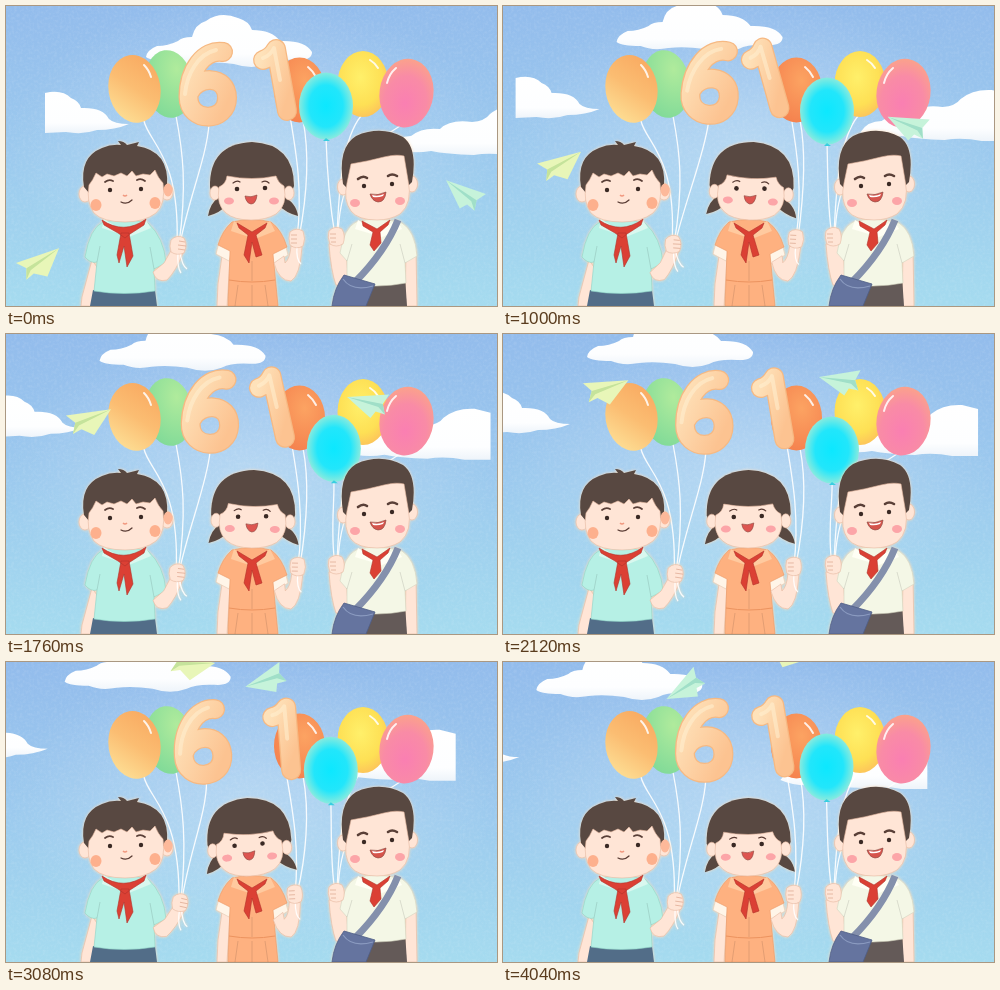
An HTML page for the animation above (4.12 s loop, 491 by 300 pixels).

```html
<!DOCTYPE html>
<html lang="en">
<head>
<meta charset="utf-8">
<title>Children with balloons</title>
<style>
html, body { margin: 0; width: 100%; height: 100%; overflow: hidden; background: #a0cbee; }
svg { position: absolute; left: 0; top: 0; width: 491px; height: 300px; }
.kid { filter: drop-shadow(0 0 1.5px #ffdfbd); }
.skin { fill: #ffe5d6; stroke: #e6b9a2; stroke-width: .6; }
.hair { fill: #584841; }
.line { fill: none; stroke: #5a3c34; stroke-width: 1.2; stroke-linecap: round; stroke-linejoin: round; }
.brow { fill: none; stroke: #5a4038; stroke-width: 1.8; stroke-linecap: round; }
.finger { fill: none; stroke: #e0ad96; stroke-width: .8; }
.string { fill: none; stroke: #fff; stroke-width: 1.3; opacity: .9; }
.shine { fill: none; stroke: #fff; stroke-width: 2; stroke-linecap: round; opacity: .85; }
.red { fill: #db4034; stroke: #b23229; stroke-width: .6; stroke-linejoin: round; }
.eye { fill: #3a2924; }
.pink { fill: #fca5a8; }
.fold { fill: none; stroke: #0000001c; }
.digit path { fill: none; stroke-linecap: round; stroke-linejoin: round; }
.digit .edge { stroke: #f6b983; stroke-width: 20; }
.digit .body { stroke: url(#peach); stroke-width: 17.5; }
.digit .glow { stroke: #fff0d2; stroke-width: 4; opacity: .55; }
</style>
</head>
<body>
<svg viewBox="0 0 491 300">
  <defs>
    <linearGradient id="sky" x2="0" y2="1">
      <stop stop-color="#93bcec"/><stop offset=".5" stop-color="#9ccaee"/><stop offset="1" stop-color="#a5dbef"/>
    </linearGradient>
    <radialGradient id="haze" cx=".5" cy=".47" r=".5">
      <stop stop-color="#fff" stop-opacity=".28"/><stop offset="1" stop-color="#fff" stop-opacity="0"/>
    </radialGradient>
    <filter id="grain" x="0" y="0" width="1" height="1">
      <feTurbulence type="fractalNoise" baseFrequency=".35" numOctaves="2" seed="4"/>
      <feColorMatrix values="0 0 0 0 1  0 0 0 0 1  0 0 0 0 1  1.2 0 0 0 -.5"/>
    </filter>
  </defs>
  <rect width="491" height="300" fill="url(#sky)"/>
  <rect width="491" height="300" fill="url(#haze)"/>
  <rect width="491" height="300" filter="url(#grain)" opacity=".18"/>
</svg>

<svg viewBox="0 0 491 300">
  <defs>
    <linearGradient id="orange" x1=".85" y1=".1" x2=".25" y2=".95"><stop stop-color="#f9ab62"/><stop offset=".5" stop-color="#fbbd72"/><stop offset="1" stop-color="#fddc92"/></linearGradient>
    <radialGradient id="green" cx=".7" cy=".3" r=".8"><stop stop-color="#b0eb9c"/><stop offset="1" stop-color="#80da98"/></radialGradient>
    <radialGradient id="coral" cx=".6" cy=".35" r=".75"><stop stop-color="#fca362"/><stop offset="1" stop-color="#f47e4c"/></radialGradient>
    <radialGradient id="yellow" cx=".45" cy=".4" r=".7"><stop stop-color="#fff06a"/><stop offset=".6" stop-color="#fee055"/><stop offset="1" stop-color="#fcb95c"/></radialGradient>
    <radialGradient id="rose" cx=".5" cy=".65" r=".72"><stop stop-color="#fa7fb2"/><stop offset=".55" stop-color="#f98ba6"/><stop offset="1" stop-color="#fba884"/></radialGradient>
    <radialGradient id="cyan" cx=".5" cy=".5" r=".52"><stop stop-color="#0ce8ff"/><stop offset=".6" stop-color="#22e6fb"/><stop offset="1" stop-color="#93ebdb"/></radialGradient>
    <linearGradient id="peach" y2=".8"><stop stop-color="#fee2ba"/><stop offset="1" stop-color="#fcc391"/></linearGradient>
    <linearGradient id="cloud" x2="0" y2="1"><stop stop-color="#fff"/><stop offset=".75" stop-color="#fdfeff"/><stop offset="1" stop-color="#eef4fa"/></linearGradient>
  </defs>

  <g id="clouds" fill="url(#cloud)">
    <path d="M140 51Q141 44 151 40Q162 40 172 35Q176 31 186 31Q189 18 200 15Q214 5 232 12Q243 15 246 24Q266 24 274 35Q299 34 306 46Q306 55 290 54Q272 53 262 58Q246 64 228 58Q208 55 192 57Q176 60 164 55Q145 55 140 51Z"/>
    <path d="M39 87Q56 83 65 92Q73 95 75 102Q97 101 103 113Q108 118 123 118Q109 124 91 124Q77 129 60 126L39 127Z"/>
    <path d="M384 141Q391 130 405 130Q416 121 434 123Q444 113 466 116Q479 115 484 108Q496 98 515 99L531 103V150H505Q485 146 468 149Q440 148 425 145Q402 149 384 141Z"/>
  </g>

  <g id="strings"></g>

  <ellipse cx="163" cy="78" rx="24" ry="34" fill="url(#green)" transform="rotate(-8 163 78)"/>
  <ellipse cx="128.500" cy="83" rx="26" ry="34" fill="url(#orange)" transform="rotate(-9 128 83)"/>
  <path class="shine" d="M138 59Q143 64 145 71"/>
  <ellipse cx="293.500" cy="84" rx="25.500" ry="32.500" fill="url(#coral)"/>
  <path class="shine" d="M302 61Q307 65 310 71"/>
  <ellipse cx="357" cy="78" rx="25.500" ry="33" fill="url(#yellow)"/>
  <path class="shine" d="M364 54Q369 57 372 62"/>
  <ellipse cx="400.500" cy="87" rx="27" ry="34.500" fill="url(#rose)" transform="rotate(8 400 87)"/>
  <path class="shine" d="M390 62Q383 68 381 77"/>
  <g id="six" class="digit"></g>
  <g id="one" class="digit"></g>
  <g id="blue">
    <ellipse cx="320" cy="100" rx="27" ry="33.500" fill="url(#cyan)"/>
    <path d="M317 135l3-3 4 3z" fill="#38cfe0"/>
  </g>

  <g id="planeA">
    <path d="M20-15L-21-1L-11 4L-11 15L-4 9L9 12Z" fill="#e8f6b8"/>
    <path d="M20-15L-11 4L-11 15L-7 6Z" fill="#c5e39b"/>
  </g>
  <g id="planeB">
    <path d="M-18-15L20-2L11 4L9 14L2 8L-5 12Z" fill="#c6f3da"/>
    <path d="M-18-15L11 4L9 14L6 5Z" fill="#a0dfc8"/>
  </g>

  <!-- boy in mint -->
  <g class="kid">
    <path class="skin" d="M86 254L76 291L75 300H86L93 264Z"/>
    <path d="M87 284H149L151 300H84Z" fill="#526d88"/>
    <path d="M97 216Q84 222 79 251Q85 258 91 256L88 285Q118 290 149 285L148 263L160 257Q158 232 142 217Q119 211 97 216Z" fill="#b6f0e5" stroke="#8fd2c6" stroke-width=".6"/>
    <path class="fold" d="M91 256L94 240M148 263L144 241"/>
    <g id="armA">
      <path class="skin" d="M147 266Q150 277 161 274Q170 265 177 247L166 243L158 257Z"/>
      <path class="string" d="M172 246Q171 262 175 267M174 246Q176 260 181 263"/>
      <path class="skin" d="M165 234Q171 228 178 232Q182 239 178 247Q171 250 165 246Q163 240 165 234Z"/>
      <path class="finger" d="M173 235L179 236M172 239L180 240M172 243L179 244"/>
    </g>
    <path d="M98 213L119 226L139 213L145 222L123 231L96 222Z" fill="#d9f8ef"/>
    <path class="red" d="M96 214Q118 229 140 213L138 219L124 228L119 232L112 227L98 219ZM115 227H123L127 250L121 261L118 240L113 257L111 249Z"/>
    <ellipse class="skin" cx="79" cy="188" rx="6" ry="8"/>
    <ellipse class="skin" cx="161" cy="186" rx="6" ry="8"/>
    <path class="hair" d="M78 181Q73 151 96 142Q105 138 115 139L112 135Q118 135 121 139L133 136L131 140Q164 145 161 181L154 187H83Z"/>
    <path class="skin" d="M83 179Q87 174 90 167L96 171L101 168L108 170L115 167L121 170L126 165L130 170L137 168L144 169L149 164Q152 172 157 177Q160 198 150 207Q138 216 119 216Q97 216 88 207Q80 196 83 179Z"/>
    <ellipse cx="90" cy="199" rx="5.500" ry="6" fill="#fdb08d"/>
    <ellipse cx="149" cy="197" rx="5.500" ry="6" fill="#fdb08d"/>
    <ellipse cx="162" cy="184" rx="4.500" ry="6.500" fill="#fdb99a"/>
    <circle class="eye" cx="104" cy="184" r="2.200"/><circle class="eye" cx="135" cy="183" r="2.200"/>
    <path class="brow" d="M99 176Q103 173 107 175M131 174Q135 172 139 175"/>
    <path class="line" d="M115 196Q121 199 126 194"/>
    <path d="M117 189q2 2 4 0" fill="none" stroke="#f1987f" stroke-width="1.500"/>
  </g>

  <!-- girl -->
  <g class="kid">
    <path class="skin" d="M216 250L212 278L211 300H221L224 252Z"/>
    <path d="M226 216Q215 224 210 248L223 255L229 235H262L268 258L282 249Q277 225 266 217Z" fill="#fff5e8" stroke="#e3c8b0" stroke-width=".6"/>
    <path d="M226 216Q216 225 212 239L224 245L222 300H272L267 248L281 241Q276 224 265 216Q246 211 226 216Z" fill="#feb180" stroke="#ea9766" stroke-width=".6"/>
    <path d="M223 274Q246 278 269 274" fill="none" stroke="#ec935f"/>
    <path class="fold" d="M232 279L229 300M246 279V300M259 279L262 300M246 255V275"/>
    <g id="armB">
      <path class="skin" d="M268 257Q273 275 285 275Q294 270 296 241L285 240Q284 253 279 257L278 250Z"/>
      <path class="string" d="M291 240Q290 254 295 258"/>
      <path class="skin" d="M284 226Q290 221 297 225Q300 233 297 240Q290 244 284 239Q282 232 284 226Z"/>
      <path class="finger" d="M285 229H291M285 233H291M285 237H291"/>
    </g>
    <path d="M228 215L245 227L264 215L269 225L249 233L225 225Z" fill="#ffca9f"/>
    <path class="red" d="M231 217L246 226L261 217L259 222L250 229L256 249L250 251L246 236L243 257L238 249L242 229L233 222Z"/>
    <g id="girl">
      <path class="hair" d="M214 190Q204 197 202 210Q214 207 222 198ZM276 190Q290 196 292 210Q280 207 271 198Z"/>
      <path class="hair" d="M204 181Q203 138 246 136Q288 138 288 180Q286 187 280 192H212Q205 188 204 181Z"/>
      <ellipse class="skin" cx="209" cy="187" rx="5" ry="7"/>
      <ellipse class="skin" cx="283" cy="187" rx="5" ry="7"/>
      <path class="skin" d="M213 181Q220 178 221 170Q246 175 270 170Q272 177 278 180Q282 199 270 208Q260 214 245 214Q228 214 220 207Q210 199 213 181Z"/>
      <ellipse class="pink" cx="223" cy="195" rx="5" ry="3.500"/>
      <ellipse class="pink" cx="268" cy="195" rx="5" ry="3.500"/>
      <circle class="eye" cx="231" cy="183" r="2.300"/><circle class="eye" cx="259" cy="182" r="2.300"/>
      <path class="line" d="M227 177Q231 174 234 176M256 176Q260 174 263 177"/>
      <path d="M239 190Q245 192 251 189Q250 198 245 198Q240 197 239 190Z" fill="#dd5550" stroke="#8a423a" stroke-width=".6"/>
    </g>
  </g>

  <!-- boy with bag -->
  <g class="kid">
    <path class="skin" d="M400 247L399 300H411L410 245Z"/>
    <path class="skin" d="M323 238Q325 265 330 279L343 280L340 245L335 238Z"/>
    <path d="M350 270H399L401 300H348Z" fill="#645a58"/>
    <path d="M350 216Q338 222 334 247L341 255L341 277Q370 283 400 277L399 257L411 250Q409 225 396 217Q371 210 350 216Z" fill="#f4f7e6" stroke="#d3d3c0" stroke-width=".6"/>
    <path class="fold" d="M341 255L346 238M399 257L394 238"/>
    <path d="M352 214L371 226L391 214L396 223L376 231L349 223Z" fill="#fffff5"/>
    <path class="red" d="M356 215L371 223L384 214L382 219L374 226L375 237L368 245L364 239L367 226L357 220Z"/>
    <path d="M392 214Q379 246 349 276" fill="none" stroke="#8490ac" stroke-width="7"/>
    <path d="M338 269L369 278L360 300H326Q328 282 338 269Z" fill="#65749f" stroke="#4f5d86" stroke-width=".8"/>
    <path d="M337 273Q346 286 367 280" fill="none" stroke="#8b9bc0" stroke-width="1.200"/>
    <path class="skin" d="M323 225Q329 219 336 223Q340 230 337 238Q330 242 324 238Q321 231 323 225Z"/>
    <path class="finger" d="M324 228H330M324 232H330M325 236H330"/>
    <ellipse class="skin" cx="337" cy="181" rx="5.500" ry="8"/>
    <ellipse class="skin" cx="406" cy="178" rx="5.500" ry="8"/>
    <path class="hair" d="M337 178Q330 131 362 126Q380 122 397 131Q412 142 406 176L398 184H343Z"/>
    <path class="skin" d="M341 177L345 158Q363 155 378 151Q390 148 398 150L402 174Q407 197 394 208Q384 214 371 214Q352 214 345 205Q337 194 341 177Z"/>
    <ellipse class="pink" cx="349" cy="197" rx="5" ry="4"/>
    <ellipse class="pink" cx="394" cy="195" rx="5" ry="4"/>
    <circle class="eye" cx="358" cy="180" r="2.200"/><circle class="eye" cx="386" cy="178" r="2.200"/>
    <path class="brow" d="M352 173Q357 169 361 172M382 170Q386 167 391 170" style="stroke-width:2.6"/>
    <path d="M364 188Q372 190 380 186Q379 196 372 196Q366 195 364 188Z" fill="#d6544c" stroke="#84403a" stroke-width=".6"/>
    <path d="M366 189Q372 191 378 188L377 190Q372 192 367 191Z" fill="#fff"/>
  </g>
</svg>

<script>
const LOOP = 4120, STEP = 40;
const KEYS = [0, 1000, 1400, 2120, 2720, 3440, 4040];
const $ = id => document.getElementById(id);
const move = (id, value) => $(id).setAttribute('transform', value);

// Smooth curve through one value per key time
function curve(v, t) {
  const last = KEYS.length - 1;
  let i = 0;
  while (i < last - 1 && t > KEYS[i + 1]) i++;
  const slope = k => {
    const a = Math.max(k - 1, 0), b = Math.min(k + 1, last);
    return (v[b] - v[a]) / (KEYS[b] - KEYS[a]);
  };
  const h = KEYS[i + 1] - KEYS[i], u = (t - KEYS[i]) / h, w = 1 - u;
  return v[i] * (1 + 2 * u) * w * w + v[i + 1] * u * u * (3 - 2 * u)
    + h * u * w * (slope(i) * w - slope(i + 1) * u);
}

const lift = [0, -15, -20, -28, -32, -29, -23];
const blue = { x: [0, 4, 6, 9, 6.5, 3.5, 3.5], y: [0, 5, 11, 16, 12, 5, 5] };
const planes = {
  planeA: { x: [32, 56, 66, 101, 150, 218, 283], y: [258, 160, 120, 56, 16, -6, -10], r: [0, 4, 8, 15, 27, 40, 50] },
  planeB: { x: [459, 407, 387, 340, 293, 233, 185], y: [190, 121, 95, 48, 24, 17, 25], r: [0, -15, -18, -28, -46, -62, -69] }
};

function digit(id, d, glow) {
  $(id).innerHTML = `<path class="edge" d="${d}"/><path class="body" d="${d}"/><path class="glow" d="${glow}"/>`;
}
digit('six', 'M217 46C198 43 182.500 64 182.500 91C182.500 117 221 117 221 92C221 68 190 70 183.500 87', 'M210 44C192 48 181 68 179 88');
digit('one', 'M257 54Q266 51 270 43L281 105', 'M257 52Q265 49 268 42L274 74');

const strings = Array.from({ length: 8 }, () => {
  const p = document.createElementNS('http://www.w3.org/2000/svg', 'path');
  p.setAttribute('class', 'string');
  return $('strings').appendChild(p);
});

function draw(now) {
  const t = Math.min(Math.floor(now % LOOP / STEP) * STEP, 4040);
  const s = Math.sin(t / LOOP * 2 * Math.PI);
  const bx = curve(blue.x, t), by = curve(blue.y, t);

  move('clouds', `translate(${-0.0264 * t} ${curve(lift, t)})`);
  move('six', `rotate(${4 * s} 230 160)`);
  move('one', `rotate(${-5.5 * s} 250 150)`);
  move('blue', `translate(${bx} ${by})`);
  move('girl', `rotate(${2.7 * s} 246 235)`);
  move('armA', `rotate(${-4 * s} 155 268)`);
  move('armB', `rotate(${3 * s} 284 272)`);
  for (const id in planes) {
    const p = planes[id];
    move(id, `translate(${curve(p.x, t)} ${curve(p.y, t)}) rotate(${curve(p.r, t)}) scale(1.05)`);
  }

  // balloon end, bend, hand
  const a = 172 - 2 * s, b = 292 + 2 * s;
  [
    [138, 115, 143, 137, 174, 150, a - 1, 238],
    [170, 110, 177, 146, 181, 180, a + 1, 238],
    [203 + 2.5 * s, 118 - 1.6 * s, 201, 150, 182, 195, a + 2, 238],
    [284 + 4 * s, 110, 290 + 4 * s, 145, 297 + 3 * s, 185, b - 1, 232],
    [297, 114, 304, 150, 300, 195, b + 1, 232],
    [320 + bx, 132 + by, 321 + bx, 165, 324, 200, 329, 230],
    [355, 110, 337, 132, 333, 180, 331, 230],
    [394, 120, 344, 150, 333, 190, 332, 230]
  ].forEach(([x, y, ...c], i) => strings[i].setAttribute('d', `M${x} ${y}C${c.join(' ')}`));

  requestAnimationFrame(() => draw(performance.now() - start));
}
const start = performance.now();
draw(0);
</script>
</body>
</html>
```
